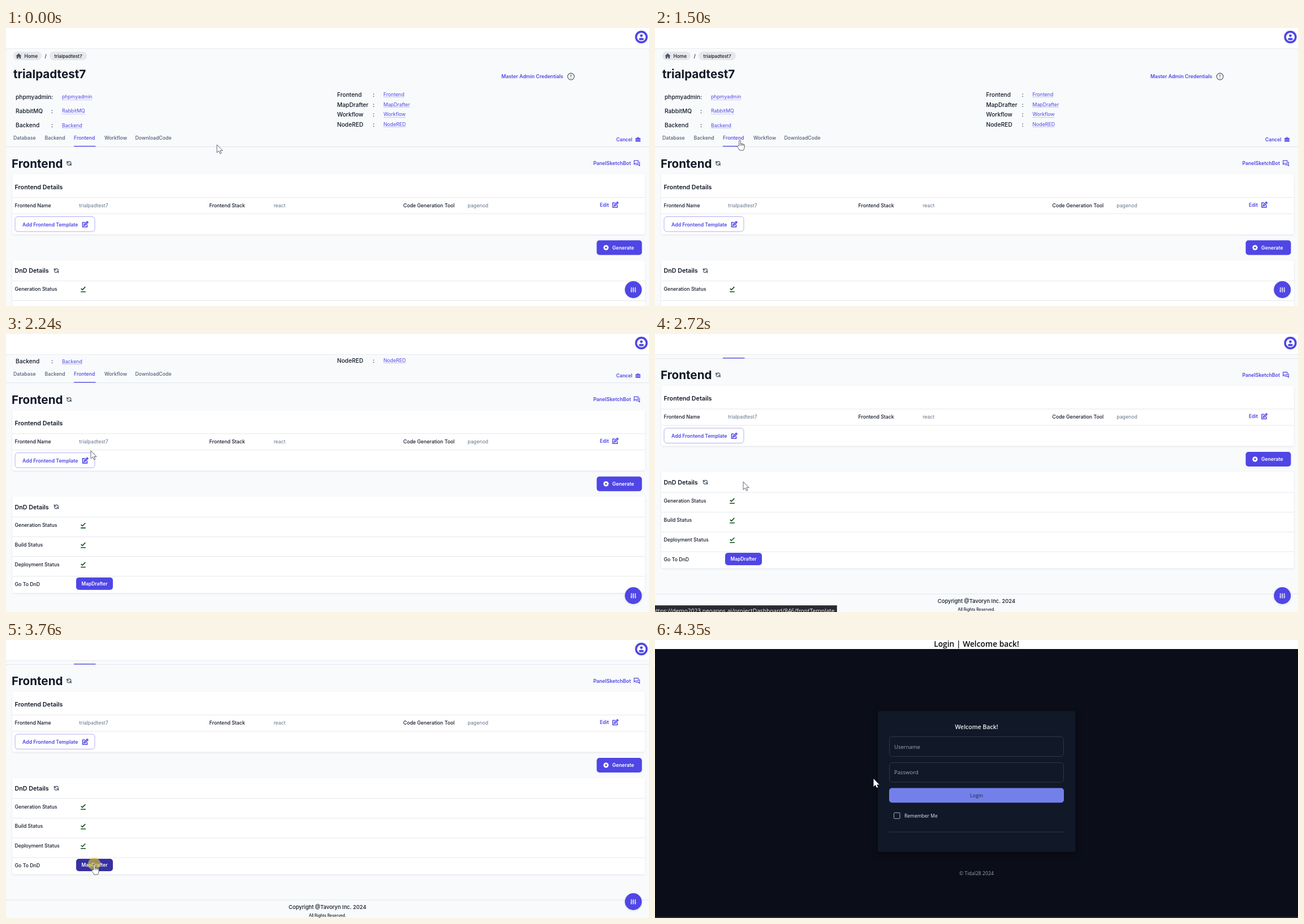
An HTML page with a canvas that plays this animation: 1137 px wide and 493 px high, repeating every 5.73 s.

```html
<!DOCTYPE html>
<html lang="en">
<head>
<meta charset="utf-8">
<title>Project dashboard</title>
<style>
html, body { margin: 0; height: 100%; overflow: hidden; background: #f8fafc; }
canvas { display: block; }
</style>
</head>
<body>
<canvas id="stage" width="1137" height="493"></canvas>
<script>
const W = 1137, H = 493, LOOP = 5730;
const ctx = document.getElementById('stage').getContext('2d');
const INK = '#111827', INDIGO = '#4f46e5', MUTED = '#64748b', RULE = '#e5e8ee';
const UI = 'Inter, sans-serif', SYSTEM = '"Open Sans", "Noto Sans", sans-serif';
const PROJECT = 'trialpadtest7', BUILDER = 'MapDrafter';

const ICONS = {
  refresh: 'M4 3v7h7M20 21v-7h-7M5 9a8 8 0 0 1 15 2M19 15a8 8 0 0 1-15-2',
  edit: 'M11 5H3v16h16v-8M8 16l1-4L19 2l3 3-10 10z',
  chat: 'M2 17V3h15v10H6zM22 7v15l-5-4H7',
  tune: 'M5 3v10M5 17v4M12 3v4M12 11v10M19 3v10M19 17v4M2 15h6M9 9h6M16 15h6',
  check: 'M4 9l5 5L20 3M3 21h18',
  alert: 'M12 6v7M12 16v2M2 12a10 10 0 1 0 20 0a10 10 0 1 0-20 0',
  teeth: 'M12 2v20M2 12h20M5 5l14 14M19 5L5 19',
  home: 'M12 2L1 12h3v10h6v-7h4v7h6V12h3z',
  case: 'M8 7V3h8v4h6v6H2V7zM10 5v2h4V5zM2 15h20v6H2z'
};
const ARROW = new Path2D('M0 0V14L3.3 11L5.6 16L7.8 15L5.6 10.4H10Z');
const HAND = new Path2D('M-1.3 11V2.3a1.3 1.3 0 0 1 2.6 0V7q4 .3 6.8 1.8V13q0 3-1.8 6H-.2Q-1.5 16-4.6 12.5Q-4.4 9.8-1.3 11Z');

const POINTER = [[60, 373, 207], [630, 150, 198], [1600, 150, 198], [1740, 150, 207],
  [2560, 150, 207], [2720, 156, 262], [3280, 157, 391], [3500, 156, 397]];
const SCROLL = [[1600, 0], [1720, 18], [1900, 68.5], [2150, 110], [2400, 148], [2650, 167.5]];

const clamp = v => Math.max(0, Math.min(1, v));
const smooth = v => v * v * (3 - 2 * v);
const linear = v => v;

function track(keys, t, ease) {
  const next = keys.findIndex(k => k[0] > t);
  if (next < 0) return keys[keys.length - 1].slice(1);
  if (next === 0) return keys[0].slice(1);
  const a = keys[next - 1], b = keys[next];
  const p = ease((t - a[0]) / (b[0] - a[0]));
  return a.slice(1).map((v, i) => v + (b[i + 1] - v) * p);
}

// y is the middle of the capitals
function text(str, x, y, { size = 8.74, weight = 500, color = INK, align = 'left', font = UI } = {}) {
  ctx.font = `${weight} ${size}px ${font}`;
  ctx.fillStyle = color;
  ctx.textAlign = align;
  ctx.textBaseline = 'alphabetic';
  ctx.fillText(str, x, y + size * 0.36);
}

function box(x, y, w, h, r, fill, stroke) {
  ctx.beginPath();
  ctx.roundRect(x, y, w, h, r);
  if (fill) { ctx.fillStyle = fill; ctx.fill(); }
  if (stroke) { ctx.strokeStyle = stroke; ctx.lineWidth = 1; ctx.stroke(); }
}

function shadowed(color, blur, dy, draw) {
  ctx.save();
  Object.assign(ctx, { shadowColor: color, shadowBlur: blur, shadowOffsetY: dy });
  draw();
  ctx.restore();
}

function disc(x, y, r, fill) {
  ctx.beginPath();
  ctx.arc(x, y, r, 0, 7);
  ctx.fillStyle = fill;
  ctx.fill();
}

function rule(x, y, w, color = RULE, h = 1) {
  ctx.fillStyle = color;
  ctx.fillRect(x, Math.round(y), w, h);
}

function icon(name, x, y, size, color, line) {
  ctx.save();
  ctx.translate(x - size / 2, y - size / 2);
  ctx.scale(size / 24, size / 24);
  const path = new Path2D(ICONS[name]);
  if (line) {
    ctx.strokeStyle = color;
    ctx.lineWidth = line;
    ctx.stroke(path);
  } else {
    ctx.fillStyle = color;
    ctx.fill(path, 'evenodd');
  }
  ctx.restore();
}

function link(str, x, y) {
  text(str, x, y, { weight: 400, color: INDIGO });
  rule(x, y + 4.5, ctx.measureText(str).width, '#c9c6f5');
}

function card(y, h) {
  shadowed('rgba(15,23,42,.1)', 3, 1, () => box(11, y, 1119, h, 4, '#fff'));
}

function projectHead() {
  box(13, 42, 50, 15, 7.5, '#e5e7eb');
  icon('home', 22.5, 49.5, 11, '#4b5563');
  text('Home', 32.5, 50, { size: 8.4 });
  text('/', 68.5, 50, { size: 9 });
  box(77, 42, 66, 15, 7.5, '#e5e7eb');
  text(PROJECT, 110, 50, { size: 8.2, align: 'center' });
  text(PROJECT, 13, 82, { size: 20.6, weight: 700 });
  text('Master Admin Credentials', 876, 86, { weight: 600, color: INDIGO });
  icon('alert', 999, 86, 14, '#4b5563', 2);

  ['phpmyadmin', 'RabbitMQ', 'Backend'].forEach((name, i) => {
    const y = 122 + i * 25.2;
    text(name, 17, y, { size: 10.2 });
    text(':', 80, y, { size: 10.2 });
    link(name, 99, y);
  });
  ['Frontend', BUILDER, 'Workflow', 'NodeRED'].forEach((name, i) => {
    const y = 118.3 + i * 17.7;
    text(name, 585.5, y, { size: 10.2 });
    text(':', 648.5, y, { size: 10.2 });
    link(name, 667.5, y - 0.4);
  });

  const tabs = [['Database', 13], ['Backend', 68.5], ['Frontend', 120], ['Workflow', 174], ['DownloadCode', 228.5]];
  for (const [name, x] of tabs)
    text(name, x, 195, { color: name === 'Frontend' ? INDIGO : '#526077' });
  text('Cancel', 1079, 198, { size: 8.5, weight: 600, color: INDIGO });
  icon('case', 1117.5, 197.5, 10.5, INDIGO);
}

function frontend() {
  text('Frontend', 10, 240.3, { size: 20.6, weight: 700 });
  icon('refresh', 111.5, 240, 11, '#475569', 2.6);
  text('PanelSketchBot', 1105, 240, { weight: 600, color: INDIGO, align: 'right' });
  icon('chat', 1115.5, 239.5, 11.5, INDIGO, 2.4);

  card(259, 107);
  text('Frontend Details', 15.5, 282, { size: 10.75, weight: 600 });
  rule(11, 300, 1119);
  const fields = [['Frontend Name', PROJECT, 15.5], ['Frontend Stack', 'react', 359.5], ['Code Generation Tool', 'pagenod', 702.5]];
  for (const [label, value, x] of fields) {
    text(label, x, 314.5);
    text(value, x + 113.7, 314.5, { weight: 400, color: MUTED });
  }
  text('Edit', 1050, 313.5, { weight: 600, color: INDIGO });
  icon('edit', 1077.5, 313.5, 12, INDIGO, 3);
  rule(11, 329, 1119);
  box(16, 334.5, 141, 26.5, 5, '#fff', '#b3aef2');
  text('Add Frontend Template', 29, 348.5, { weight: 600, color: INDIGO });
  icon('edit', 140, 348.2, 12, INDIGO, 3.2);

  box(1044.5, 376.5, 80, 26, 5, INDIGO);
  icon('teeth', 1061, 389.5, 11.5, '#fff', 4.6);
  disc(1061, 389.5, 3.9, '#fff');
  disc(1061, 389.5, 1.7, INDIGO);
  text('Generate', 1072, 389.5, { weight: 600, color: '#fff' });
}

function dnd(hover) {
  card(412, 171);
  text('DnD Details', 15.5, 430.5, { size: 10.7, weight: 600 });
  icon('refresh', 89, 430.3, 11, '#475569', 2.6);
  ['Generation Status', 'Build Status', 'Deployment Status', 'Go To DnD'].forEach((label, i) => {
    const y = 463 + i * 34.8;
    rule(11, 448 + i * 35, 1119);
    text(label, 15.5, y);
    if (i < 3) icon('check', 136.5, y + 0.4, 11.5, '#0b4a17', 3.2);
  });
  const tint = [[79, 55], [70, 48], [229, 163]].map(([a, b]) => a + (b - a) * hover);
  box(124, 555.5, 65, 22, 5, `rgb(${tint})`);
  text(BUILDER, 156.5, 566.7, { size: 8.4, weight: 600, color: '#fff', align: 'center' });

  rule(0, 628, W);
  text('Copyright @Tavoryn Inc. 2024', 568.5, 641.5, { size: 9.4, align: 'center' });
  text('All Rights Reserved.', 568.5, 656.3, { size: 6.9, align: 'center' });
}

function statusBar(str, width, right) {
  box(-2, 481.5, width + 2, 20, 0, '#2b2a33', '#5a5963');
  text(str, right, 491.3, { size: 10.2, weight: 400, color: '#f4f4f8', align: 'right', font: SYSTEM });
}

function dashboard(t) {
  const [scroll] = track(SCROLL, t, linear);
  ctx.fillStyle = '#f8fafc';
  ctx.fillRect(0, 0, W, H);

  ctx.save();
  ctx.translate(0, -scroll);
  projectHead();
  ctx.restore();
  rule(0, 210 - scroll, W, '#e2e6ec');
  rule(120, 209 - scroll, 38.5, INDIGO, 1.3);
  ctx.save();
  ctx.translate(0, -scroll);
  frontend();
  dnd(clamp((t - 3300) / 200));
  ctx.restore();

  ctx.fillStyle = '#fff';
  ctx.fillRect(0, 0, W, 36);
  rule(0, 36, W, '#e8ebf0');
  disc(1123.5, 16, 11.2, INDIGO);
  disc(1123.5, 16, 7.6, '#fff');
  disc(1123.5, 13.6, 2.4, INDIGO);
  ctx.beginPath();
  ctx.ellipse(1123.5, 19.6, 4.4, 2.2, 0, 0, 7);
  ctx.fill();

  shadowed('rgba(15,23,42,.12)', 4, 1, () => disc(1109.3, 464, 15, INDIGO));
  icon('tune', 1109.3, 464.3, 12, '#fff', 2.6);
  if (t >= 2300 && t < 2850)
    statusBar('https://demo2023.neoapps.ai/projectDashboard/846/frontTemplate', 321.5, 317.5);
}

function login(t) {
  const label = (str, x, y, size, color, weight = 400, align = 'left') =>
    text(str, x, y, { size, color, weight, align, font: SYSTEM });
  ctx.fillStyle = '#2b2a33';
  ctx.fillRect(0, 0, W, H);
  if (t < 4220) statusBar('Transferring data from cdn.syncfusion.com', 251.5, 197.5);
  if (t < 4150) return;

  ctx.save();
  ctx.globalAlpha = clamp((t - 4100) / 250);
  ctx.fillStyle = '#0b0e19';
  ctx.fillRect(0, 0, W, 491);
  ctx.fillStyle = '#fff';
  ctx.fillRect(0, 0, W, 16);
  label('Login | Welcome back!', 568.5, 7, 13.8, '#0b0b0f', 600, 'center');
  shadowed('rgba(0,0,0,.5)', 10, 3, () => box(394, 126, 349.5, 250, 4, '#111827'));
  label('Welcome Back!', 568.5, 154.3, 10.5, '#edf0f5', 600, 'center');
  box(414.5, 171.5, 308, 35, 5, null, '#2f3747');
  label('Username', 423, 189.3, 9.5, '#a2a9b6');
  box(414.5, 217.5, 308, 34.5, 5, null, '#2f3747');
  label('Password', 423, 235, 9.5, '#a2a9b6');
  box(414, 262.5, 309, 26, 5, '#7480ea');
  label('Login', 568.5, 275.6, 9, '#1b2036', 400, 'center');
  box(422.5, 306.3, 10.5, 10.5, 1, null, '#a3b0c4');
  label('Remember Me', 441, 312, 8.5, '#e8ebf0');
  rule(414, 340, 309, '#2b3342');
  label('© Tidal28 2024', 568.5, 413.5, 8.7, '#9aa2b1', 400, 'center');
  ctx.restore();
}

function pointer(t) {
  const dark = t >= 3950;
  const [x, y] = dark ? [386.5, 246] : track(POINTER, t, smooth);
  const clicking = (t >= 760 && t < 1090) || (t >= 3760 && !dark);
  const hand = !dark && ((t >= 560 && t < 1660) || t >= 3280);
  if (clicking) disc(x, y, 11, 'rgba(222,205,45,.62)');
  ctx.save();
  ctx.translate(x, y);
  ctx.lineJoin = 'round';
  ctx.lineWidth = 0.8;
  ctx.strokeStyle = '#3c3e4a';
  ctx.fillStyle = '#fff';
  const shape = hand ? HAND : ARROW;
  ctx.fill(shape);
  if (!dark) ctx.stroke(shape);
  if (hand) ctx.stroke(new Path2D('M1.3 7V11M3.7 7.4V11M6 8V11'));
  ctx.restore();
}

function frame(now) {
  const t = now % LOOP;
  if (t < 3950) dashboard(t); else login(t);
  pointer(t);
  requestAnimationFrame(frame);
}
requestAnimationFrame(frame);
</script>
</body>
</html>
```
